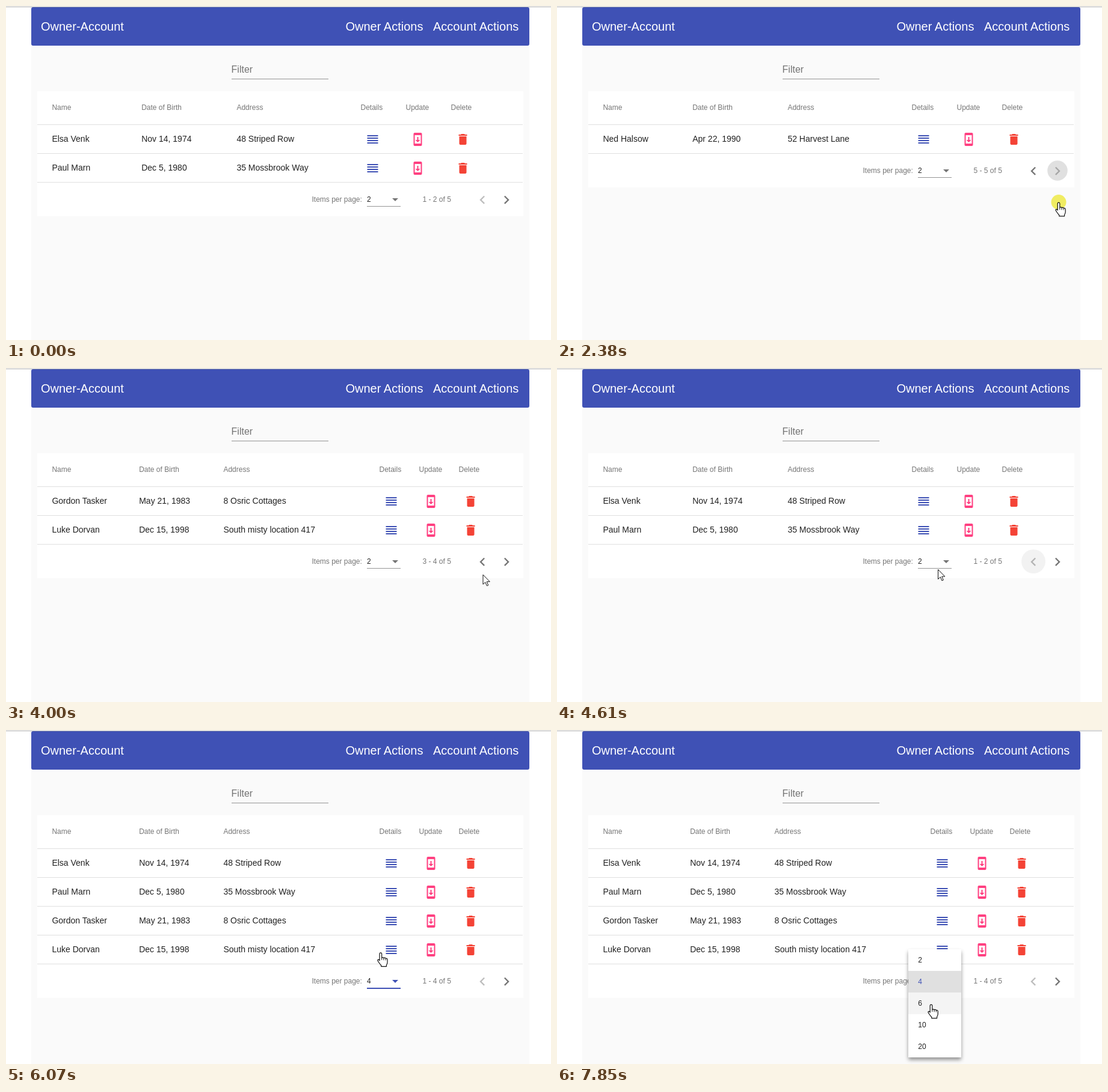
An HTML page for the animation above (8 s loop, 906 by 556 pixels).

```html
<!DOCTYPE html>
<html lang="en">
<head>
<meta charset="utf-8">
<title>Owner-Account</title>
<style>
  html, body { margin: 0; width: 100%; height: 100%; overflow: hidden; background: #fff; }
  svg { display: block; font-family: "Liberation Sans", Arial, sans-serif; }
  text { white-space: pre; }
</style>
</head>
<body>
<svg id="stage" width="906" height="556" viewBox="0 0 906 556"></svg>
<script>
const LOOP = 8000, TICK = 1000 / 13, LEAD = 16;
const BLUE = '#3f51b5', PINK = '#ff4081', RED = '#f44336';
const DARK = 'rgba(0,0,0,.87)', GREY = 'rgba(0,0,0,.54)', FAINT = 'rgba(0,0,0,.26)';

const OWNERS = [
  ['Elsa Venk', 'Nov 14, 1974', '48 Striped Row'],
  ['Paul Marn', 'Dec 5, 1980', '35 Mossbrook Way'],
  ['Gordon Tasker', 'May 21, 1983', '8 Osric Cottages'],
  ['Luke Dorvan', 'Dec 15, 1998', 'South misty location 417'],
  ['Ned Halsow', 'Apr 22, 1990', '52 Harvest Lane']
];
const HEADS = ['Name', 'Date of Birth', 'Address', 'Details', 'Update', 'Delete'];
const NARROW = [76.4, 225.2, 383.4, 589.5, 664.5, 739.5];
const WIDE = [76.4, 221.2, 361.4, 620.5, 686.5, 752.5];
const SIZES = [2, 4, 6, 10, 20];

// start time, first owner, page size, column positions
const PAGES = [
  [0, 0, 2, NARROW], [1650, 2, 2, WIDE], [2380, 4, 2, NARROW],
  [3190, 2, 2, WIDE], [4200, 0, 2, NARROW], [5840, 0, 4, WIDE]
];

// time, hotspot x, hotspot y, pointer shape
const POINTER = [
  [0, 690, 580, 'arrow'], [153, 690, 580, 'arrow'], [230, 690, 546, 'arrow'],
  [1000, 804, 343, 'arrow'], [1150, 826, 331, 'hand'], [1385, 833, 326, 'hand'],
  [1615, 833, 326, 'hand'], [1770, 837, 343, 'arrow'], [1923, 838, 346, 'arrow'],
  [2000, 838, 346, 'arrow'], [2150, 834, 327, 'hand'], [2460, 834, 327, 'hand'],
  [2540, 828, 319, 'arrow'], [2840, 794, 287, 'hand'], [3000, 789, 284, 'hand'],
  [3320, 789, 284, 'hand'], [3500, 790, 330, 'hand'], [3610, 792, 360, 'arrow'],
  [3770, 793, 378, 'arrow'], [3923, 793, 363, 'arrow'], [4070, 792, 326, 'hand'],
  [4230, 792, 326, 'hand'], [4380, 740, 334, 'arrow'], [4615, 633, 335, 'arrow'],
  [4765, 638, 325, 'hand'], [4923, 651, 324, 'hand'], [5230, 651, 324, 'hand'],
  [5540, 624, 362, 'hand'], [5769, 620, 360, 'hand'], [5920, 620, 360, 'hand'],
  [6692, 634, 413, 'hand'], [6846, 632, 422, 'hand'], [7150, 632, 422, 'hand'],
  [7462, 622, 473, 'hand'], [7600, 622, 473, 'hand'], [7846, 622, 457, 'hand'],
  [8000, 622, 457, 'hand']
];
const CLICKS = [[1600, 1680], [2300, 2400], [3070, 3170], [4070, 4170], [5070, 5170], [5760, 5840], [6990, 7090]];
// start, duration, button centre x
const RIPPLES = [[1630, 270, 832], [2330, 300, 832], [3180, 560, 792], [4165, 600, 792]];
// start, end, box x, box y, box width, label
const TIPS = [
  [1200, 1740, 801, 265, 61, 'Next page'],
  [2940, 3500, 752, 217, 80, 'Previous page'],
  [4120, 4400, 752, 265, 80, 'Previous page']
];
// open, close, top, chosen size
const MENUS = [[5130, 5840, 305, 2], [7060, 9000, 365, 4]];
const FOCUS_FROM = 5130;

const ICONS = {
  list: 'M3 15h18v-2H3zM3 19h18v-2H3zM3 11h18V9H3zM3 5v2h18V5z',
  update: 'M17 1H7C5.900 1 5 1.900 5 3v18c0 1.100.9 2 2 2h10c1.100 0 2-.9 2-2V3c0-1.100-.9-2-2-2zM17 19H7V5h10zM16 13h-3V8h-2v5H8l4 4z',
  trash: 'M6 19c0 1.100.9 2 2 2h8c1.100 0 2-.9 2-2V7H6zM19 4h-3.500l-1-1h-5l-1 1H5v2h14z',
  left: 'M15.410 7.410L14 6l-6 6 6 6 1.410-1.410L10.830 12z',
  right: 'M10 6L8.590 7.410 13.170 12l-4.580 4.590L10 18l6-6z'
};
const SHAPES = {
  arrow: '<path d="M.5 .5V16.500L4.300 13l2.600 6 2.400-1L6.700 12.100H11.800z" fill="#fff" stroke="#111"/>',
  hand: `<path d="M-1.800 13V2a1.800 1.800 0 0 1 3.600 0V8.200q1.800-1 3.300.4q2-.8 3.200.8q2.800-.4 2.900 2.400V16q0 2-1.600 4.500V22.800H.8V21Q-1.600 18.500-3.500 15.500Q-5.500 13-4.800 11.800Q-3.600 10.400-1.800 13z"
    fill="#fff" stroke="#111" stroke-width="1.200" stroke-linejoin="round"/><path d="M1.800 8v4M5.100 9v3.400M8.300 10v2.600" stroke="#111" fill="none"/>`
};

const clamp = v => Math.max(0, Math.min(1, v));
const rect = (x, y, w, h, fill, more = '') => `<rect x="${x}" y="${y}" width="${w}" height="${h}" fill="${fill}" ${more}/>`;
const text = (x, y, size, fill, str) => `<text x="${x}" y="${y}" font-size="${size}" fill="${fill}">${str}</text>`;
const icon = (name, x, y, fill, scale = 1) =>
  `<path d="${ICONS[name]}" fill="${fill}" fill-rule="evenodd" transform="translate(${x} ${y}) scale(${scale})"/>`;
const latest = (list, t) => list.filter(item => item[0] <= t).pop();

function pointerAt(t) {
  const from = latest(POINTER, t);
  const to = POINTER[POINTER.indexOf(from) + 1] || from;
  const u = to === from ? 0 : (t - from[0]) / (to[0] - from[0]);
  const mix = i => from[i] + (to[i] - from[i]) * u;
  return { x: mix(1), y: mix(2), shape: from[3] };
}

const frame = '<defs><filter id="lift" x="-30%" y="-20%" width="160%" height="140%">' +
  '<feDropShadow dx="0" dy="4" stdDeviation="3" flood-opacity=".42"/></filter></defs>' +
  rect(0, 0, 906, 556, '#fff') + rect(0, 1, 906, 1, '#b0b0b0') +
  rect(42, 2, 828, 554, '#fafafa') + rect(42, 2, 828, 64, BLUE, 'rx="3"') +
  text(58, 41, 20, '#fff', 'Owner-Account') +
  text(564.5, 41, 20, '#fff', 'Owner Actions') +
  text(710, 41, 20, '#fff', 'Account Actions') +
  text(374.6, 111, 16, GREY, 'Filter') + rect(375, 121, 161, 1, '#949494');

function table(rows, cols) {
  let out = rect(52, 142, 808, 112 + 48 * rows.length, '#fff');
  HEADS.forEach((head, i) => out += text(cols[i], 173, 12, GREY, head));
  for (let i = 0; i <= rows.length; i++) out += rect(52, 197 + 48 * i, 807, 1, '#e0e0e0');
  rows.forEach((row, r) => {
    const y = 48 * r;
    row.forEach((cell, i) => out += text(cols[i], 226 + y, 14, DARK, cell));
    out += icon('list', cols[3] + 8, 210 + y, BLUE) +
      icon('update', cols[4] + 8, 210 + y, PINK) +
      icon('trash', cols[5] + 8, 210 + y, RED);
  });
  return out;
}

function ripple([start, span, x], t) {
  const u = (t - start) / span;
  if (u < 0 || u >= 1) return '';
  const radius = 20 * (1 - (1 - clamp(u / .4)) ** 3);
  const alpha = .12 * clamp((1 - u) / .58);
  return `<circle cx="${x}" cy="322" r="${radius}" fill="#000" opacity="${alpha}"/>`;
}

function paginator(first, size, count, t) {
  const focused = t >= FOCUS_FROM;
  const last = first + count;
  return `<g transform="translate(0 ${48 * (count - 2)})">` +
    text(508.5, 326, 12, GREY, 'Items per page:') + text(600, 326, 12, DARK, size) +
    `<path d="M642 320h10l-5 5z" fill="${focused ? BLUE : GREY}"/>` +
    rect(600, 333, 56, focused ? 2 : 1, focused ? BLUE : '#949494') +
    text(692.5, 326, 12, GREY, `${first + 1} - ${last} of 5`) +
    RIPPLES.map(r => ripple(r, t)).join('') +
    icon('left', 778, 308.7, first ? GREY : FAINT, 28 / 24) +
    icon('right', 818, 308.7, last < 5 ? GREY : FAINT, 28 / 24) + '</g>';
}

function tip([start, end, x, y, w, label], t) {
  const show = Math.min(clamp((t - start) / 150), clamp((end - t) / 100));
  if (!show) return '';
  return `<g opacity="${show}" transform="translate(${x + w / 2} ${y + 23}) scale(${show}) translate(${-w / 2} -23)">` +
    rect(0, 0, w, 23, '#616161', 'rx="2" opacity=".9"') + text(7.7, 15, 10, '#fff', label) + '</g>';
}

function menu([open, close, top, chosen], t, pointer) {
  const grow = clamp((t - open) / 120);
  const show = Math.min(grow, clamp((close + 160 - t) / 160));
  if (!show) return '';
  const over = pointer.x > 584 && pointer.x < 672 ? Math.floor((pointer.y - top) / 36) : -1;
  const options = SIZES.map((size, i) => {
    const picked = size === chosen;
    const back = picked ? '#e0e0e0' : i === over ? '#f4f4f4' : '#fff';
    return rect(584, 36 * i, 88, 36, back) + text(600.3, 36 * i + 22, 12, picked ? BLUE : DARK, size);
  }).join('');
  return `<g opacity="${show}" transform="translate(0 ${top}) scale(1 ${grow})">` +
    rect(584, 0, 88, 180, '#fff', 'rx="2" filter="url(#lift)"') + options + '</g>';
}

function scene(t) {
  const [, first, size, cols] = latest(PAGES, t);
  const rows = OWNERS.slice(first, first + size);
  const pointer = pointerAt(t);
  const clicked = CLICKS.some(([a, b]) => t >= a && t < b);
  return frame + table(rows, cols) + paginator(first, size, rows.length, t) +
    TIPS.map(item => tip(item, t)).join('') +
    MENUS.map(item => menu(item, t, pointer)).join('') +
    `<g transform="translate(${pointer.x} ${pointer.y})">` +
    (clicked ? '<circle cy="-.5" r="12.500" fill="#eee83c" opacity=".8"/>' : '') +
    SHAPES[pointer.shape] + '</g>';
}

const stage = document.getElementById('stage');
const began = performance.now();
let shown = -1;
function play() {
  const t = (performance.now() - began) % LOOP;
  const step = Math.floor((t + LEAD) / TICK);
  if (step !== shown) {
    shown = step;
    stage.innerHTML = scene(step * TICK);
  }
  requestAnimationFrame(play);
}
play();
</script>
</body>
</html>
```
